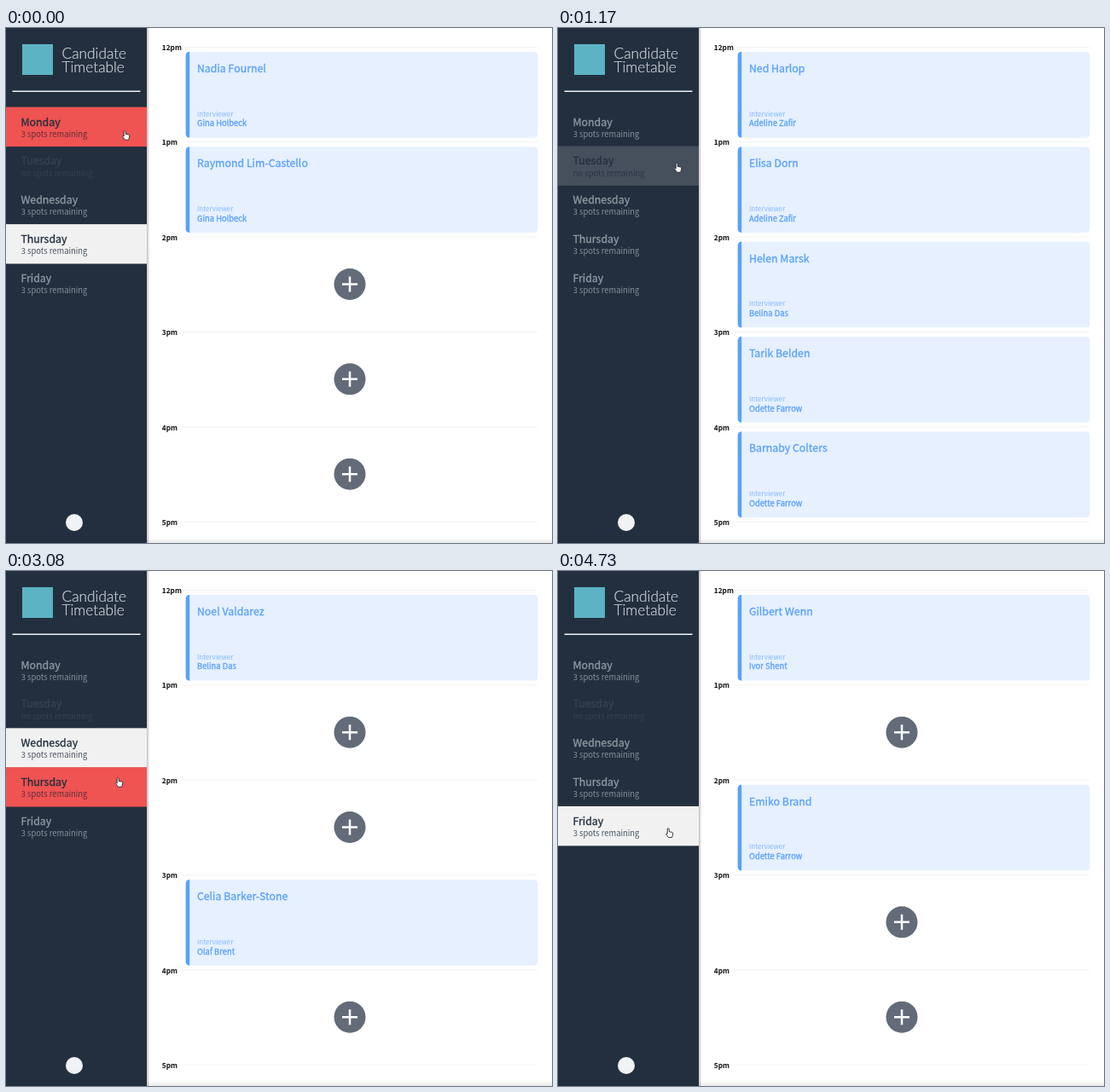
These frames come from a looping animation (640x604 px, 4.88 s). An HTML page:

```html
<!DOCTYPE html>
<html lang="en">
<head>
<meta charset="utf-8">
<title>Interview planner</title>
<style>
html, body { margin: 0; width: 100%; height: 100%; overflow: hidden; background: #fff; }
svg { display: block; width: 640px; height: 604px; }
text {
  font-family: "Noto Sans CJK JP", "Noto Sans CJK SC", "Noto Sans CJK", "Open Sans", sans-serif;
  fill: currentColor; stroke: currentColor; stroke-width: 0;
}
.brand { font: 300 17.3px Lato, sans-serif; color: #d3d8dd; stroke-width: .2px; }
.day { font-size: 12.4px; stroke-width: .3px; }
.spots { font-size: 9.4px; font-weight: 300; }
.hour { font-size: 8.3px; font-weight: 700; color: #111; }
.name { font-size: 12.35px; color: #59a1fb; stroke-width: .3px; }
.role { font-size: 7.95px; font-weight: 300; color: #84b8fa; }
.host { font-size: 9.4px; color: #59a1fb; stroke-width: .3px; }
</style>
</head>
<body>
<svg id="stage" viewBox="0 0 640 604">
  <defs>
    <linearGradient id="side"><stop stop-color="#000" stop-opacity=".25"/><stop offset="1" stop-color="#000" stop-opacity="0"/></linearGradient>
    <linearGradient id="foot" x2="0" y2="1"><stop stop-color="#000" stop-opacity="0"/><stop offset="1" stop-color="#000" stop-opacity=".09"/></linearGradient>
    <clipPath id="card"><rect x="210.7" width="412.6" height="101" rx="4.5"/></clipPath>
  </defs>
  <rect width="640" height="604" fill="#fff"/>
  <g id="grid"></g>
  <g id="slots"></g>
  <rect x="165" y="598" width="475" height="6" fill="url(#foot)"/>
  <rect x="165" width="3.5" height="604" fill="url(#side)"/>
  <rect width="165" height="604" fill="#222f3e"/>
  <rect x="19" y="19" width="36" height="36" fill="#5bb3c4"/>
  <text class="brand" x="65.5" y="36">Candidate</text>
  <text class="brand" x="65.5" y="52">Timetable</text>
  <path d="M7.5 74.2H157.5" stroke="#f2f4f5" stroke-width="1.5"/>
  <g id="days"></g>
  <circle cx="80" cy="580" r="10" fill="#f0f2f3"/>
  <path id="hand" fill="#fff" stroke="#26262c" stroke-width=".9" stroke-linejoin="round"
    d="M-2.8-4.5a1 1 0 0 1 2 0V-1.6l3.4.7q1.4.3 1.2 1.8L3.2 3.4 2.6 5.2H-1.6L-4.2 1.6q-.4-1.2.6-1.2l.8.6z"/>
</svg>
<script>
const LOOP = 4880, FPS = 12;
const ROW_TOP = 93, ROW_H = 45.8, SLOT_H = 111.35;
const RED = [239, 83, 82], NAVY = [34, 47, 62];
const byId = id => document.getElementById(id);

// Each day's five slots: [candidate, interviewer], or 0 when open.
const week = [
  ["Monday", [0, ["Elliot Maren", "Harriet Lin"], ["Kent Nakaborise", "Harriet Lin"], 0, 0]],
  ["Tuesday", [["Ned Harlop", "Adeline Zafir"], ["Elisa Dorn", "Adeline Zafir"],
    ["Helen Marsk", "Belina Das"], ["Tarik Belden", "Odette Farrow"], ["Barnaby Colters", "Odette Farrow"]]],
  ["Wednesday", [["Noel Valdarez", "Belina Das"], 0, 0, ["Celia Barker-Stone", "Olaf Brent"], 0]],
  ["Thursday", [["Nadia Fournel", "Gina Holbeck"], ["Raymond Lim-Castello", "Gina Holbeck"], 0, 0, 0]],
  ["Friday", [["Gilbert Wenn", "Ivor Shent"], 0, ["Emiko Brand", "Odette Farrow"], 0, 0]]
];

// Clicks: [tick, day]. Pointer path: [tick, x, y].
const clicks = [[0, 3], [1, 0], [14, 1], [27, 2], [40, 3], [52, 4]];
const path = [
  [0, 141, 126], [1, 141, 126], [7, 141, 162], [10, 141, 162], [11, 141, 163], [12, 141, 163],
  [13, 141, 164], [14, 141, 164], [17, 141, 166], [18, 141, 166], [22, 139, 212], [23, 139, 212],
  [25, 138, 219], [30, 138, 219], [37, 133, 248], [42, 133, 248], [46, 131, 299], [47, 131, 299],
  [50, 131, 306], [54, 131, 306], [55, 131, 306.5], [56, 131, 307.3]
];

const text = (cls, x, y, str) => `<text class="${cls}" x="${x}" y="${y}">${str}</text>`;

function card([name, host]) {
  return `<g clip-path="url(#card)"><rect x="210" width="414" height="101" fill="#e6f0ff"/>` +
    `<rect x="210" width="5.2" height="101" fill="#59a1fb"/></g>` +
    text("name", 223.9, 24, name) + text("role", 224, 75.8, "Interviewer") + text("host", 224, 87.7, host);
}

const addButton = `<circle cx="403" cy="50" r="18.5" fill="#626b77"/>` +
  `<path d="M394 50h18M403 41v18" stroke="#fff" stroke-width="2.5"/>`;

function slotsFor(day) {
  return week[day][1].map((slot, i) =>
    `<g transform="translate(0 ${27.8 + i * SLOT_H})">${slot ? card(slot) : addButton}</g>`).join("");
}

byId("grid").innerHTML = ["12pm", "1pm", "2pm", "3pm", "4pm", "5pm"].map((label, i) => {
  const y = 22.5 + i * SLOT_H;
  return `<path d="M207 ${y}H623" stroke="#f2f2f2"/>` + text("hour", 182.8, y + 3.6, label);
}).join("");

byId("days").innerHTML = week.map(([name], i) =>
  `<g transform="translate(0 ${ROW_TOP + i * ROW_H})"${i === 1 ? ' opacity=".17"' : ""}>` +
  `<rect y="-.3" width="165" height="${ROW_H + .6}"/>` + text("day", 17.4, 21.6, name) +
  text("spots", 17.8, 34.8, (i === 1 ? "no" : "3") + " spots remaining") + "</g>").join("");
const rows = [...byId("days").children];

function pointer(tick) {
  const n = path.findIndex(p => p[0] > tick);
  if (n < 0) return path[path.length - 1].slice(1);
  const [t0, x0, y0] = path[n - 1], [t1, x1, y1] = path[n];
  const u = (tick - t0) / (t1 - t0), e = u * u * (3 - 2 * u);
  return [x0 + (x1 - x0) * e, y0 + (y1 - y0) * e];
}

const rowUnder = tick => Math.floor((pointer(tick)[1] - 5 - ROW_TOP) / ROW_H);

// The hover colour eases in over a few ticks.
function hoverLevel(tick) {
  const row = rowUnder(tick);
  for (let back = 1; back < 3; back++)
    if (tick >= back && rowUnder(tick - back) !== row) return back / 3;
  return 1;
}

const mix = (a, b, u) => `rgb(${a.map((v, i) => Math.round(v + (b[i] - v) * u))})`;

let shownDay = -1, shownTick = -1;

function draw(ms) {
  const tick = Math.floor((ms + 4) * FPS / 1000);
  if (tick === shownTick) return;
  shownTick = tick;
  const day = clicks.filter(c => c[0] <= tick).pop()[1];
  if (day !== shownDay) byId("slots").innerHTML = slotsFor(shownDay = day);

  const hover = rowUnder(tick), level = hoverLevel(tick);
  rows.forEach((row, i) => {
    const [box, name, spots] = row.children;
    const on = i === day, hot = i === hover;
    box.setAttribute("fill", on ? "#f1f1f1" : hot ? mix(NAVY, RED, level) : "none");
    name.style.color = on || hot ? "#222f3e" : "#8f99a3";
    spots.style.color = on ? "#4a5460" : hot ? "#5f2f3d" : "#87919b";
  });
  byId("hand").setAttribute("transform", `translate(${pointer(tick).join(" ")})`);
}

const start = performance.now();
function frame() {
  draw((performance.now() - start) % LOOP);
  requestAnimationFrame(frame);
}
draw(0);
requestAnimationFrame(frame);
</script>
</body>
</html>
```
